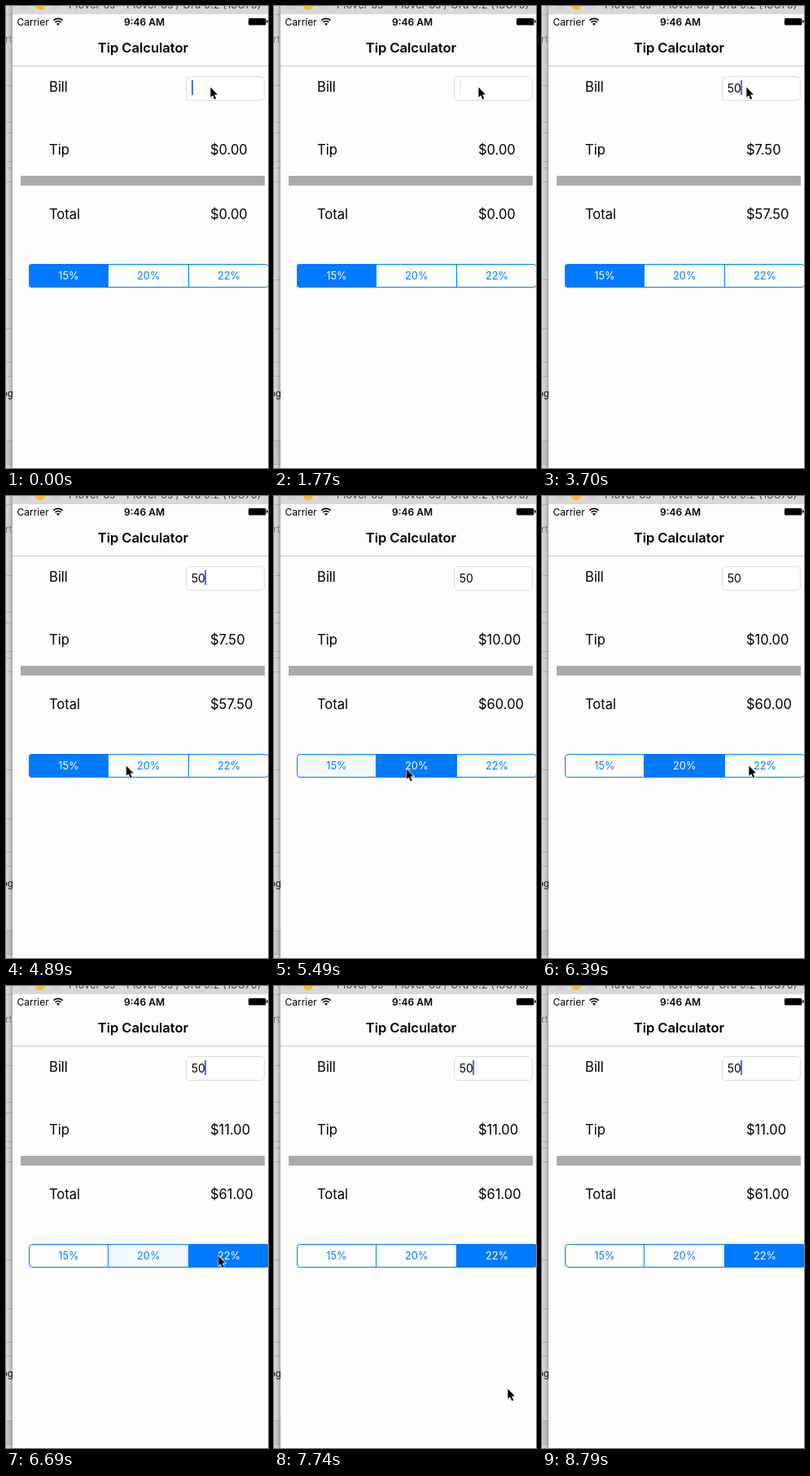
Write an HTML page that moves like this. It is 322 by 566 pixels and loops after 8890 ms.

```html
<!DOCTYPE html>
<html lang="en">
<head>
<meta charset="utf-8">
<title>Tip Calculator</title>
<style>
  html, body { margin: 0; width: 100%; height: 100%; overflow: hidden; background: #fefefe; }
  svg { display: block; font: 16.6px Inter, "Liberation Sans", sans-serif; letter-spacing: -.003em; }
  .small { font-size: 12px; letter-spacing: 0; }
  .bold { font-weight: 600; }
  .mid { text-anchor: middle; }
  .seg { font-size: 12.8px; letter-spacing: 0; text-anchor: middle; }
  .bill { font-size: 14px; letter-spacing: 0; }
  .blue { fill: #007aff; }
  .white { fill: #fff; }

  .anim { animation: 8.89s step-end infinite; }
  #caret { animation-name: blink; }
  #caretPos { animation-name: type; }
  #pointer { animation-name: point; }
  #empty { animation-name: empty; }
  #five { animation-name: five; }
  #fifteen { animation-name: fifteen; }
  #twenty { animation-name: twenty; }
  #twentyTwo { animation-name: twentyTwo; }
  #seg1 { animation-name: seg1; }
  #seg2 { animation-name: seg2; }
  #seg3 { animation-name: seg3; }

  @keyframes blink {
    0%, 9.89%, 21.59%, 33.29%, 53.31%, 65.12%, 75.25%, 87.06%, 98.87%, 100% { opacity: 1; }
    4.94%, 14.84%, 19.91%, 26.65%, 31.6%, 46.56%, 51.63%, 58.38%, 63.44%,
    70.19%, 73.56%, 80.31%, 85.37%, 92.12%, 97.18% { opacity: .12; }
    6.63%, 16.53%, 28.23%, 48.25%, 60.06%, 71.87%, 82%, 93.81% { opacity: 0; }
    38.24%, 41.61% { opacity: 1; }
  }
  @keyframes type {
    0%, 100% { transform: none; }
    38.24% { transform: translateX(8.3px); }
    41.61% { transform: translateX(16.1px); }
  }

  /* amounts */
  @keyframes empty { 0%, 100% { opacity: 1; } 38.24% { opacity: 0; } }
  @keyframes five { 0%, 41.61%, 100% { opacity: 0; } 38.24% { opacity: 1; } }
  @keyframes fifteen { 0%, 61.75%, 100% { opacity: 0; } 41.61% { opacity: 1; } }
  @keyframes twenty { 0%, 75.25%, 100% { opacity: 0; } 61.75% { opacity: 1; } }
  @keyframes twentyTwo { 0%, 100% { opacity: 0; } 75.25% { opacity: 1; } }

  /* percentage buttons */
  @keyframes seg1 { 0%, 100% { opacity: 1; } 61.75% { opacity: .04; } 63.44% { opacity: 0; } }
  @keyframes seg2 {
    0%, 76.94%, 100% { opacity: 0; }
    60.06% { opacity: .15; }
    61.75% { opacity: 1; }
    75.25% { opacity: .04; }
  }
  @keyframes seg3 { 0%, 100% { opacity: 0; } 73.56% { opacity: .15; } 75.25% { opacity: 1; } }

  @keyframes point {
    0%, 100% { transform: translate(251px, 98px); }
    48.25% { transform: translate(246px, 125px); }
    49.94% { transform: translate(224px, 185px); }
    51.63% { transform: translate(190px, 255px); }
    53.31% { transform: translate(160px, 310px); }
    55% { transform: translate(147.5px, 329px); }
    56.69% { transform: translate(162.5px, 333px); }
    66.81% { transform: translate(172px, 333px); }
    68.5% { transform: translate(198px, 332px); }
    70.19% { transform: translate(232px, 330px); }
    71.87% { transform: translate(254px, 329px); }
    73.56% { transform: translate(260.5px, 329px); }
    80.31% { transform: translate(262px, 334px); }
    82% { transform: translate(266px, 352px); }
    83.69% { transform: translate(275px, 392px); }
    85.37% { transform: translate(283px, 442px); }
    87.06% { transform: translate(287px, 492px); }
    88.75% { transform: translate(286px, 530px); }
    90.43% { transform: translate(284px, 553px); }
    92.12% { transform: translate(284px, 560px); }
    93.81% { transform: translate(284px, 600px); }
  }
</style>
</head>
<body>
<svg width="322" height="566" viewBox="0 0 322 566">
  <defs>
    <linearGradient id="shade">
      <stop offset="0" stop-color="#dadada"/>
      <stop offset=".6" stop-color="#c8c8c8"/>
      <stop offset="1" stop-color="#a6a6a6"/>
    </linearGradient>
    <clipPath id="edge"><rect width="8" height="566"/></clipPath>
    <clipPath id="pill"><rect x="28" y="316" width="295" height="29" rx="4"/></clipPath>
  </defs>

  <!-- window behind -->
  <g clip-path="url(#edge)">
    <rect width="8" height="566" fill="url(#shade)"/>
    <rect y="533" width="8" height="28" fill="#000" opacity=".07"/>
    <path d="M0 10.5h8M0 97.5h8M0 142.5h8M0 155.5h8M0 190.5h8M0 198.5h8M0 215.5h8M0 335.5h8M0 395.5h8M0 436.5h8M0 453.5h8M0 532.5h8M0 561.5h8" stroke="#000" stroke-opacity=".16"/>
    <text x="-7" y="45" font-size="11" fill="#777">ert</text>
    <text x="-5" y="479" font-size="11.5" fill="#111">og</text>
  </g>

  <!-- title bar -->
  <rect x="8" width="314" height="10" fill="#d9d7d9"/>
  <circle cx="22" cy="-1" r="6" fill="#d1cfd1"/>
  <circle cx="42" cy="-1" r="6" fill="#fdb827"/>
  <circle cx="61" cy="-1" r="6" fill="#d1cfd1"/>
  <text x="77" y="3.2" font-size="13" letter-spacing="0" fill="#444">Plover 6s – Plover 6s / Oru 9.2 (13C75)</text>

  <!-- status and navigation bars -->
  <rect x="8" y="10" width="314" height="63" fill="#fcfcfc"/>
  <rect x="8" y="73" width="314" height="493" fill="#fefefe"/>
  <path d="M8 73.5h314" stroke="#c6c6c6"/>
  <text class="small" x="13.5" y="23.5">Carrier</text>
  <path d="M58.4 17.6A8 8 0 0 1 69.6 17.6M60.5 20A5 5 0 0 1 67.5 20" fill="none" stroke="#000" stroke-width="1.7"/>
  <path d="M64 24l-2-2.2a3 3 0 0 1 4 0z"/>
  <text class="small bold mid" x="170" y="23.5">9:46 AM</text>
  <rect x="298" y="15" width="21.5" height="8.5" rx="1.6"/>
  <rect x="320.3" y="17.3" width="1.5" height="3.4" rx=".7"/>
  <text class="bold mid" x="168.4" y="57">Tip Calculator</text>

  <!-- form -->
  <text x="53.1" y="104.6">Bill</text>
  <text x="53" y="181.6">Tip</text>
  <text x="53" y="260.6">Total</text>
  <rect x="221.5" y="86.5" width="96" height="29" rx="4.5" fill="#fff" stroke="#dcdcdc"/>
  <rect x="18" y="208" width="300" height="12" fill="#aaa"/>

  <g id="empty" class="anim">
    <text x="251" y="181.6">$0.00</text>
    <text x="251" y="260.6">$0.00</text>
  </g>
  <g id="five" class="anim" opacity="0">
    <text class="bill" x="227.8" y="105.6">5</text>
    <text x="251" y="181.6">$0.75</text>
    <text x="251" y="260.6">$5.75</text>
  </g>
  <g id="fifteen" class="anim" opacity="0">
    <text class="bill" x="227.8" y="105.6">50</text>
    <text x="251" y="181.6">$7.50</text>
    <text x="251" y="260.6">$57.50</text>
  </g>
  <g id="twenty" class="anim" opacity="0">
    <text class="bill" x="227.8" y="105.6">50</text>
    <text x="251" y="181.6">$10.00</text>
    <text x="251" y="260.6">$60.00</text>
  </g>
  <g id="twentyTwo" class="anim" opacity="0">
    <text class="bill" x="227.8" y="105.6">50</text>
    <text x="251" y="181.6">$11.00</text>
    <text x="251" y="260.6">$61.00</text>
  </g>
  <g id="caretPos" class="anim">
    <rect id="caret" class="anim" x="228" y="91" width="1.9" height="18" fill="#4267e0"/>
  </g>

  <!-- percentage buttons -->
  <g class="seg blue">
    <text x="77" y="335.3">15%</text>
    <text x="175.3" y="335.3">20%</text>
    <text x="274" y="335.3">22%</text>
  </g>
  <g clip-path="url(#pill)" class="seg">
    <g id="seg1" class="anim">
      <rect class="blue" x="28" y="316" width="98" height="29"/>
      <text class="white" x="77" y="335.3">15%</text>
    </g>
    <g id="seg2" class="anim" opacity="0">
      <rect class="blue" x="125" y="316" width="100" height="29"/>
      <text class="white" x="175.3" y="335.3">20%</text>
    </g>
    <g id="seg3" class="anim" opacity="0">
      <rect class="blue" x="224" y="316" width="99" height="29"/>
      <text class="white" x="274" y="335.3">22%</text>
    </g>
  </g>
  <rect x="28.5" y="316.5" width="294" height="28" rx="3.5" fill="none" stroke="#007aff"/>
  <path d="M125.5 316v29M224.5 316v29" stroke="#007aff"/>

  <g id="pointer" class="anim">
    <path d="M.4 1.6V13.9L3.1 11.3 5.3 16.2 7.2 15.4 5.2 10.6H8.9z" stroke="#fff" stroke-width="1.8" stroke-linejoin="round" paint-order="stroke"/>
  </g>
</svg>
</body>
</html>
```
